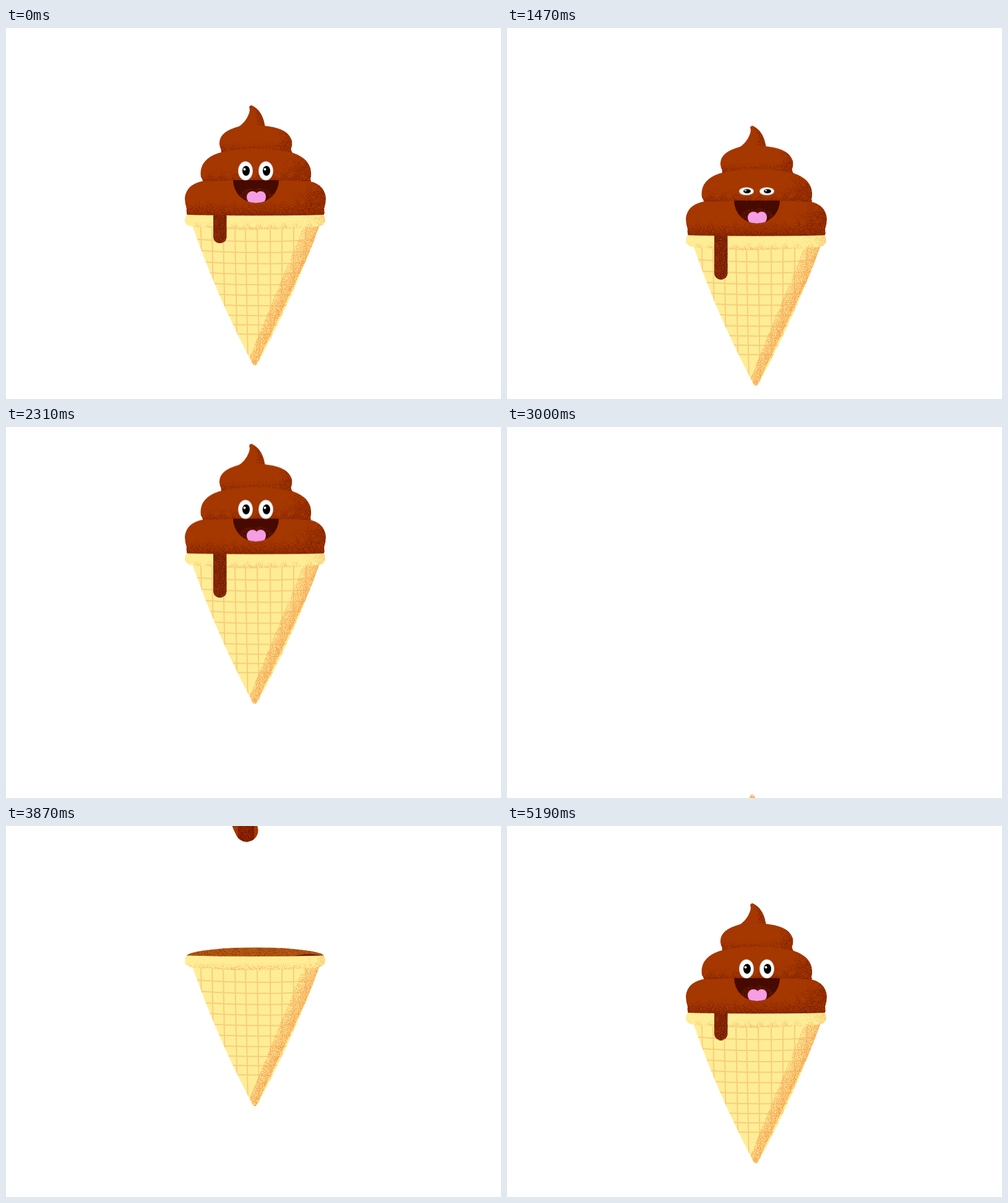
Animation of 800 by 600 pixels, one loop 5220 ms. Source, as an HTML page without scripts:

```html
<!DOCTYPE html>
<html lang="en">
<head>
<meta charset="utf-8">
<title>Happy cone</title>
<style>
html, body { margin: 0; width: 100%; height: 100%; overflow: hidden; background: #fff; }
svg { display: block; width: 100%; height: 100%; }

.anim { animation: 5220ms linear infinite; }
.scene { animation-name: jump; }
.toss { animation-name: rise, spin; transform-origin: 402px 413px; }
.rope { animation-name: pour; }
.tier { animation-name: grow; }
.low { transform-origin: 403px 302px; }
.mid { transform-origin: 403px 250px; animation-delay: -5070ms; }
.top { transform-origin: 406px 197px; animation-delay: -4935ms; }
.curl { animation-name: curl; transform-origin: 400px 160px; }
.eyes { animation-name: look; transform-origin: 387px 231px; }
.lids { animation-name: blink; transform-origin: 404px 231px; }
.mouth { animation-name: speak; transform-origin: 404px 246px; }
.drip { animation-name: drip; animation-delay: -580ms; }

@keyframes jump {
  0% { transform: none; }
  20.69% { transform: translateY(0); animation-timing-function: cubic-bezier(.5, 0, .667, 1); }
  32.57% { transform: translateY(53.5px); animation-timing-function: cubic-bezier(.333, 0, .82, 0); }
  49.42%, 56.5% { transform: translateY(-560px); }
  56.51%, 100% { transform: translateY(0); }
}
@keyframes rise {
  0%, 49.42% { translate: 0 0; }
  49.43% { translate: 0 1000px; }
  56.5% { translate: 0 1000px; }
  56.9% { translate: 0 373px; animation-timing-function: cubic-bezier(.333, .667, .667, 1); }
  67.82% { translate: 0 -187px; animation-timing-function: cubic-bezier(.333, 0, .667, 1); }
  80.4%, 100% { translate: 0 0; }
}
@keyframes spin {
  0%, 49.42% { rotate: 0deg; }
  49.43%, 56.89% { rotate: -200deg; }
  56.9% { rotate: -200deg; animation-timing-function: cubic-bezier(.333, .667, .667, 1); }
  70.11%, 100% { rotate: 0deg; }
}
@keyframes pour {
  0%, 73.33% { transform: translateY(-1000px); }
  73.56% { transform: translateY(-648px); }
  83.91% { transform: translateY(-108px); }
  86.78% { transform: translateY(0); }
  89.08% { transform: translateY(86px); }
  89.09%, 100% { transform: translateY(-1000px); }
}
@keyframes grow {
  0%, 49.42% { transform: scale(1); }
  49.43%, 78.9% { transform: scale(.35, 0); }
  82.2% { transform: scale(1.01, 1.04); }
  84%, 100% { transform: scale(1); }
}
@keyframes curl {
  0% { transform: scale(1); animation-timing-function: ease-in-out; }
  5.2% { transform: scale(1, 1.07); animation-timing-function: ease-in-out; }
  10.5%, 49.42% { transform: scale(1); }
  49.43%, 89.08% { transform: scale(1, 0); }
  89.09% { transform: scale(.97, 1.85); }
  90.4% { transform: scale(1.05, .86); animation-timing-function: ease-in-out; }
  93% { transform: scale(1, 1.07); animation-timing-function: ease-in-out; }
  96% { transform: scale(1, .98); }
  98.5%, 100% { transform: scale(1); }
}
@keyframes look {
  0%, 49.42% { transform: none; }
  49.43%, 85% { transform: translateX(125px) scaleX(.6); }
  86.78% { transform: translateX(77px) scaleX(.75); animation-timing-function: cubic-bezier(.33, .55, .67, 1); }
  91.5%, 100% { transform: translateX(0) scaleX(1); }
}
@keyframes speak {
  0%, 49.42% { transform: none; }
  49.43%, 85% { transform: translateX(62px) scale(.7, 0); }
  86.78% { transform: translate(30px, -1px) scale(.95, .53); animation-timing-function: cubic-bezier(.33, .55, .67, 1); }
  91.5%, 100% { transform: translate(0, 0) scale(1); }
}
@keyframes blink {
  0%, 26.82% { transform: scaleY(1); }
  28.93% { transform: scaleY(.1); }
  31.42%, 100% { transform: scaleY(1); }
}
@keyframes drip {
  0% { transform: translateY(-74px); animation-timing-function: cubic-bezier(.333, .85, .667, 1); }
  32.2%, 60% { transform: translateY(0); }
  60.01%, 100% { transform: translateY(-74px); }
}
</style>
</head>
<body>
<svg viewBox="0 0 800 600">
  <defs>
    <!-- turns soft gradients into speckles -->
    <filter id="grain" color-interpolation-filters="sRGB" x="-5%" y="-5%" width="110%" height="110%">
      <feTurbulence type="fractalNoise" baseFrequency=".95" numOctaves="1" seed="4"/>
      <feColorMatrix values="0 0 0 0 0  0 0 0 0 0  0 0 0 0 0  3 0 0 0 -1" result="noise"/>
      <feComposite in="SourceAlpha" in2="noise" operator="arithmetic" k2="1" k3="1" k4="-1"/>
      <feComponentTransfer result="dots"><feFuncA type="linear" slope="2.6"/></feComponentTransfer>
      <feComponentTransfer in="SourceGraphic"><feFuncA type="linear" slope="20"/></feComponentTransfer>
      <feComposite in2="dots" operator="in"/>
    </filter>

    <linearGradient id="under" x2="0" y2="1">
      <stop offset=".55" stop-color="#741c00" stop-opacity="0"/>
      <stop offset="1" stop-color="#741c00" stop-opacity=".78"/>
    </linearGradient>
    <linearGradient id="side" y2=".25">
      <stop offset=".78" stop-color="#741c00" stop-opacity="0"/>
      <stop offset="1" stop-color="#741c00" stop-opacity=".55"/>
    </linearGradient>
    <linearGradient id="ropeShade" gradientUnits="userSpaceOnUse" x1="376" x2="414" y1="0" y2="0">
      <stop offset=".3" stop-color="#741c00" stop-opacity="0"/>
      <stop offset="1" stop-color="#741c00" stop-opacity=".75"/>
    </linearGradient>
    <linearGradient id="ropeEnd" gradientUnits="userSpaceOnUse" x1="0" x2="0" y1="420" y2="640">
      <stop offset="0" stop-color="#741400" stop-opacity="0"/>
      <stop offset="1" stop-color="#741400" stop-opacity=".85"/>
    </linearGradient>
    <linearGradient id="rimShade" x2="0" y2="1">
      <stop offset=".4" stop-color="#f6a95a" stop-opacity="0"/>
      <stop offset="1" stop-color="#f6a95a" stop-opacity=".65"/>
    </linearGradient>
    <linearGradient id="rimSide">
      <stop offset=".82" stop-color="#f6a95a" stop-opacity="0"/>
      <stop offset="1" stop-color="#f6a95a" stop-opacity=".5"/>
    </linearGradient>
    <linearGradient id="coneShade" gradientUnits="userSpaceOnUse" x1="420" y1="422" x2="456" y2="439">
      <stop offset="0" stop-color="#f6a656" stop-opacity=".25"/>
      <stop offset="1" stop-color="#f6a656" stop-opacity=".9"/>
    </linearGradient>

    <path id="low" d="M293 302Q291 298 292 292Q289 284 289 275Q291 254 316 248Q403 244 492 248Q515 254 517 275Q517 284 514 292Q515 298 514 302Q403 304 293 302Z"/>
    <path id="mid" d="M318 253Q319 246 315 241Q311 213 344 202Q403 188 464 202Q495 213 493 239Q491 246 494 253Z"/>
    <path id="top" d="M347 204Q349 198 346 193Q339 169 377 159Q400 154 424 159Q456 163 462 182Q463 190 461 194Q460 199 465 204Q406 194 347 204Z"/>
    <path id="curl" d="M374 161Q387 153 392 140Q395 133 393 128Q394 125 397 125Q415 133 419 161Z"/>
    <path id="rope" d="M388 35C400 56 403 78 396 101S386 140 388 165S404 230 396 260S382 320 388 350S403 420 396 450S376 510 378 540S370 588 389 624"/>
    <path id="cone" d="M300 316Q339 430 397 540Q402 551 408 540Q467 430 508 316Z"/>
    <path id="rim" d="M292 302Q289 306 289 312Q290 319 300 321Q402 331 505 321Q515 319 516 312Q516 306 514 302Q402 305 292 302Z"/>
    <path id="row" d="M300 341Q402 349 510 342"/>
    <path id="smile" d="M367 246H441A37 37 0 0 1 367 246Z"/>
    <g id="eye">
      <ellipse rx="12" ry="15.5" fill="#d9c8c0"/>
      <ellipse rx="11" ry="14.5" fill="#fff"/>
      <ellipse cx="1" rx="6" ry="8" fill="#000"/>
      <circle cx="-1.5" cy="-2.5" r="2" fill="#fff"/>
    </g>

    <clipPath id="inCone"><use href="#cone"/></clipPath>
    <clipPath id="inMouth"><use href="#smile"/></clipPath>
    <clipPath id="inBody"><use href="#low"/><use href="#mid"/></clipPath>
    <clipPath id="aboveRim"><path d="M0-900H800V300H0Z"/></clipPath>
    <clipPath id="belowRim"><path d="M0 300H800V900H0Z"/></clipPath>
  </defs>

  <g class="anim scene">
    <!-- opening of the cone -->
    <g class="anim toss">
      <ellipse cx="403" cy="303" rx="111" ry="14" fill="#b65a14"/>
      <ellipse cx="403" cy="303" rx="111" ry="14" fill="#7e2c00" fill-opacity=".4" filter="url(#grain)"/>
      <path d="M464 303Q490 296 514 303Z" fill="#701c00"/>
    </g>

    <g clip-path="url(#aboveRim)">
      <g class="anim rope" fill="none" stroke-width="37" stroke-linecap="round">
        <use href="#rope" stroke="#a53700"/>
        <g filter="url(#grain)">
          <use href="#rope" stroke="url(#ropeShade)"/>
          <use href="#rope" stroke="url(#ropeEnd)"/>
        </g>
      </g>
    </g>

    <!-- cone -->
    <g class="anim toss">
      <use href="#cone" fill="#ffed96"/>
      <g clip-path="url(#inCone)">
        <g fill="none" stroke="#f6c878" stroke-width="2" opacity=".85">
          <path d="M315 322l4 220M333 322l4 220M351 322l4 220M370 322l4 220M387 322l4 220M406 322l3 220M427 322l1 220M446 322v220M465 322l-1 220M485 322l-2 220"/>
          <use href="#row"/>
          <use href="#row" y="18"/>
          <use href="#row" y="36"/>
          <use href="#row" y="53"/>
          <use href="#row" y="70"/>
          <use href="#row" y="87"/>
          <use href="#row" y="104"/>
          <use href="#row" y="120"/>
          <use href="#row" y="135"/>
          <use href="#row" y="150"/>
        </g>
        <path d="M482 318L392 536L402 550L512 318Z" fill="url(#coneShade)" filter="url(#grain)"/>
      </g>
      <use href="#rim" fill="#ffed96"/>
      <use href="#rim" fill="url(#rimShade)" filter="url(#grain)"/>
      <use href="#rim" fill="url(#rimSide)" filter="url(#grain)"/>
    </g>

    <g clip-path="url(#belowRim)">
      <g class="anim drip">
        <rect x="335" y="286" width="21.5" height="88" rx="10.7" fill="#943006"/>
        <rect x="335" y="286" width="21.5" height="88" rx="10.7" fill="#5f1200" fill-opacity=".55" filter="url(#grain)"/>
      </g>
    </g>

    <!-- swirl -->
    <g class="anim curl">
      <use href="#curl" fill="#a53700"/>
      <path d="M397 125Q415 133 419 161H402Q410 143 397 125Z" fill="#741c00" fill-opacity=".45" filter="url(#grain)"/>
    </g>
    <g class="anim tier top">
      <use href="#top" fill="#a53700"/>
      <use href="#top" fill="url(#under)" filter="url(#grain)"/>
      <use href="#top" fill="url(#side)" filter="url(#grain)"/>
    </g>
    <g class="anim tier mid">
      <use href="#mid" fill="#a53700"/>
      <use href="#mid" fill="url(#under)" filter="url(#grain)"/>
      <use href="#mid" fill="url(#side)" filter="url(#grain)"/>
    </g>
    <g class="anim tier low">
      <use href="#low" fill="#a53700"/>
      <use href="#low" fill="url(#under)" filter="url(#grain)"/>
      <use href="#low" fill="url(#side)" filter="url(#grain)"/>
    </g>

    <!-- face -->
    <g clip-path="url(#inBody)">
      <g class="anim mouth">
        <use href="#smile" fill="#470a00"/>
        <g clip-path="url(#inMouth)">
          <ellipse cx="404" cy="278" rx="30" ry="20" fill="#7a2408" fill-opacity=".45" filter="url(#grain)"/>
          <path d="M405 267C409 262 420 263 420 273Q420 283 411 283H398Q389 283 389 273C390 263 401 262 405 267Z" fill="#f59ee4"/>
        </g>
      </g>
      <g class="anim eyes">
        <g class="anim lids">
          <use href="#eye" x="387" y="231"/>
          <use href="#eye" x="420" y="231"/>
        </g>
      </g>
    </g>
  </g>
</svg>
</body>
</html>
```
